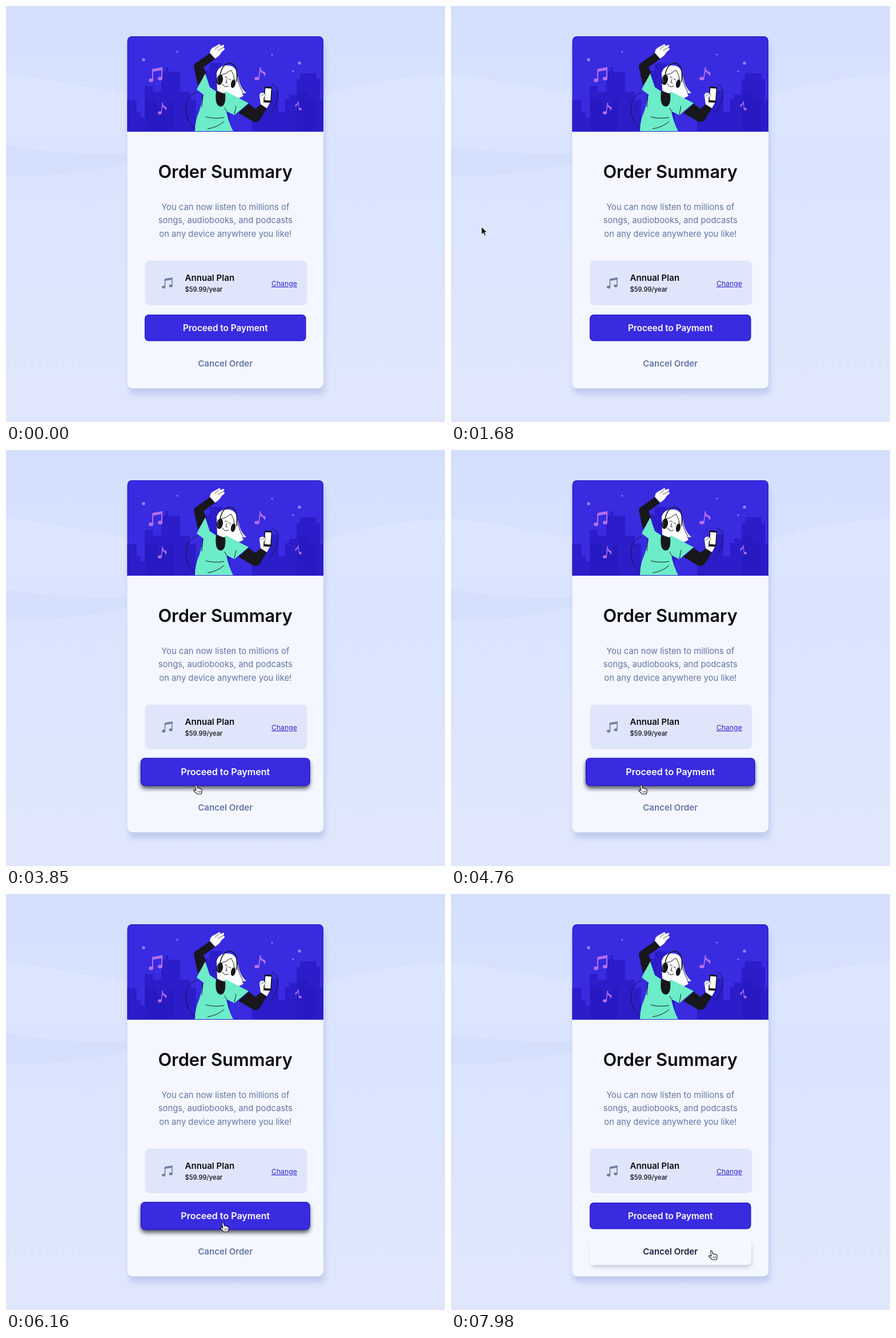
Write an HTML page that moves like this. It is 769 px wide and 728 px high and loops after 8000 ms.

```html
<!DOCTYPE html>
<html lang="en">
<head>
<meta charset="utf-8">
<title>Order Summary</title>
<style>
html, body { margin: 0; width: 100%; height: 100%; overflow: hidden; background: #dce5fd; }
svg { display: block; width: 100%; height: 100%; font-family: Inter, "Open Sans", sans-serif; }
.mid { text-anchor: middle; }
.semi { font-weight: 600; }
.ink { fill: #0b0b12; }
.muted { fill: #6474a6; }
.anim { animation: 8s linear infinite; }

#cursor { animation-name: travel; }
@keyframes travel {
  0%, 16.6% { transform: translate(-24px, 352px); animation-timing-function: ease-in; }
  21% { transform: translate(53px, 386px); }
  29% { transform: translate(200px, 474px); }
  36.75% { transform: translate(333px, 550px); animation-timing-function: ease-out; }
  41.5%, 67% { transform: translate(333px, 586px); animation-timing-function: ease-in-out; }
  75%, 92.2% { transform: translate(380px, 575px); animation-timing-function: ease-in-out; }
  98.6%, 100% { transform: translate(456px, 624px); }
}
#arrow { animation-name: arrow; animation-timing-function: step-end; }
@keyframes arrow { 0% { opacity: 1; } 37.6%, 100% { opacity: 0; } }
#hand { animation-name: hand; animation-timing-function: step-end; }
@keyframes hand { 0% { opacity: 0; } 37.6%, 100% { opacity: 1; } }

#pay { transform-origin: 384.2px 563px; animation-name: grow; }
@keyframes grow {
  0%, 37.6% { transform: scale(1); animation-timing-function: ease; }
  41.4%, 87.2% { transform: scale(1.05); animation-timing-function: ease-out; }
  89.3%, 100% { transform: scale(1); }
}
#lift { animation-name: lift; }
@keyframes lift {
  0%, 37.6% { opacity: 0; }
  41.4%, 87.2% { opacity: 1; }
  89.6% { opacity: .2; }
  92%, 100% { opacity: 0; }
}
#dent { animation-name: dent; }
@keyframes dent {
  0%, 87.2% { opacity: 0; }
  89%, 91% { opacity: 1; }
  94.5%, 100% { opacity: 0; }
}
#ripple { transform-origin: 380px 575px; animation-name: ripple; }
@keyframes ripple {
  0%, 87.2% { transform: scale(.1); opacity: 0; }
  87.4% { transform: scale(.2); opacity: 1; }
  90.1% { transform: scale(1); opacity: .9; }
  92.4%, 100% { transform: scale(1.25); opacity: 0; }
}
#cancelLift { animation-name: cancelLift; }
@keyframes cancelLift { 0%, 95.8% { opacity: 0; } 98.6%, 100% { opacity: 1; } }
#cancel { animation-name: cancel; }
@keyframes cancel { 0%, 95.8% { fill: #6474a6; } 98.6%, 100% { fill: #1b1f3d; } }
</style>
</head>
<body>
<svg viewBox="0 0 769 728" preserveAspectRatio="none">
  <defs>
    <linearGradient id="sky" x2="0" y2="1">
      <stop stop-color="#d3dffd"/><stop offset=".45" stop-color="#dae4fd"/><stop offset="1" stop-color="#e0e7fc"/>
    </linearGradient>
    <linearGradient id="haze" x2="0" y2="1">
      <stop stop-color="#e0e8ff" stop-opacity=".7"/><stop offset="1" stop-color="#e0e8ff" stop-opacity="0"/>
    </linearGradient>
    <radialGradient id="inset" r=".75"><stop offset=".4" stop-color="#1b0fa8" stop-opacity=".08"/><stop offset="1" stop-color="#1b0fa8" stop-opacity=".65"/></radialGradient>
    <filter id="soft" x="-20%" y="-50%" width="140%" height="200%"><feGaussianBlur stdDeviation="5"/></filter>
    <filter id="tight" x="-20%" y="-50%" width="140%" height="200%"><feGaussianBlur stdDeviation="3.5"/></filter>
    <clipPath id="header"><path d="M212.5 220V62q0-9 9-9H547q9 0 9 9V220Z"/></clipPath>
    <g id="pair">
      <path d="M7 3 24 0V5L7 8Z"/>
      <path d="M7 4V22M23 2V19" fill="none" stroke="currentColor" stroke-width="2"/>
      <ellipse cx="4" cy="23" rx="4" ry="3.3"/><ellipse cx="20" cy="20" rx="4" ry="3.3"/>
    </g>
    <g id="single">
      <path d="M10 0Q12 7 19 9Q21 13 17 16Q18 11 11 9Z"/>
      <path d="M10.5 0 8 19" fill="none" stroke="currentColor" stroke-width="1.8"/>
      <ellipse cx="4.5" cy="20" rx="4.5" ry="3"/>
    </g>
  </defs>

  <rect width="769" height="728" fill="url(#sky)"/>
  <path d="M0 119Q110 133 212 155V278Q100 303 0 299Z" fill="url(#haze)"/>
  <path d="M0 244Q110 262 212 258V275Q110 300 0 297Z" fill="#cfdcfa" opacity=".5"/>
  <path d="M556 158Q650 126 769 120V300H556Z" fill="url(#haze)"/>

  <rect x="215" y="64" width="344" height="616" rx="9" fill="#8ea4d8" opacity=".38" filter="url(#soft)"/>
  <rect x="212.5" y="53" width="343.5" height="616" rx="9" fill="#f4f7ff"/>

  <g clip-path="url(#header)">
    <rect x="212" y="53" width="345" height="168" fill="#382be0"/>
    <path d="M212 220V165H229V186H236V195H243V140H257V150H272V115H279V107H284V115H305V150H322V164H333V220ZM345 220V113H357V100H379V113H392V220ZM431 220V190H447V160H456V148H477V186H489V163H496V155H509V128H515V118H544V128H550V165H557V220Z" fill="#2b1dc9"/>
    <path d="M244 220V163H265V178H284V164H294V220M510 220V151H528V162H544V220" fill="#2618bd" opacity=".55"/>
    <g fill="#7590fa">
      <circle cx="241" cy="94" r="2.8"/><circle cx="514" cy="100" r="2.8"/>
      <circle cx="300" cy="80" r="1.5"/><circle cx="466" cy="85" r="1.5"/><circle cx="503" cy="114" r="1.6"/>
    </g>
    <g fill="#b66eeb" color="#b66eeb">
      <use href="#pair" x="250" y="107"/>
      <use href="#single" x="435" y="107"/>
      <use href="#single" transform="translate(266 169) scale(.78 .9)"/>
      <use href="#single" transform="translate(518 166) scale(-.58 .72)"/>
    </g>

    <g fill="none" stroke="#17133f" stroke-width="1">
      <path d="M334 151Q315 158 315 179T331 216M466 137Q479 142 476 159T462 188"/>
    </g>
    <path d="M358 82 331 101Q328 104 330 110L336 139 351 119 346 107 367 92Z" fill="#17171c"/>
    <path d="M357 82Q358 74 364 72L373 67Q377 66 374 70L381 68Q384 69 380 73L383 74Q384 76 378 80Q374 88 366 92Z" fill="#fff"/>
    <path d="M366 76 373 70M371 78 380 73" stroke="#23212c" stroke-width=".8"/>

    <path d="M369 117Q373 104 387 104Q401 104 405 117L409 134Q413 146 421 152Q416 154 413 151L416 157Q404 166 389 157L370 148Z" fill="#fff"/>
    <path d="M349 118 334 146 346 155Q342 177 335 193Q331 205 331 221H399Q390 205 386 184L400 191 425 170 386 150 369 150 357 142Z" fill="#6cecc8"/>
    <path d="M368 149Q365 175 376 176Q386 175 384 153Z" fill="#17171c"/>
    <path d="M370 123Q372 148 382 150Q394 149 397 137L394 114Q380 113 370 123Z" fill="#fff"/>
    <path d="M377 142 385 149 382 153 376 151Z" fill="#fff"/>
    <g fill="none" stroke="#1b1820" stroke-width="1">
      <path d="M376 121Q386 119 394 112Q400 120 400 129M383 125Q386 123 388 126M390 127 394 130M387 128 385 134 388 135M379 136Q383 144 390 140M405 118Q406 137 415 151"/>
      <path d="M345 156 343 177M350 194Q366 198 382 195M386 184 383 178M353 215Q371 212 382 202M400 190 403 175"/>
      <path d="M375 121Q379 100 393 100Q407 102 404 133" stroke-width="1.6"/>
    </g>
    <ellipse cx="374.5" cy="129" rx="5.5" ry="9" transform="rotate(12 374 129)" fill="#17171c"/>
    <ellipse cx="398" cy="136" rx="4" ry="7.5" transform="rotate(12 398 136)" fill="#17171c"/>
    <path d="M372 124Q369 129 372 134" fill="none" stroke="#777" stroke-width="1"/>

    <path d="M425 171 437 180 446 172 457 179 444 200Q438 206 431 201L407 187Z" fill="#17171c"/>
    <path d="M446 172 444 156Q445 151 451 152L463 157Q466 161 463 168L457 179Z" fill="#fff"/>
    <g transform="rotate(4 458 155)">
      <rect x="452" y="141" width="13.5" height="28" rx="2" fill="#17171c"/>
      <rect x="453.6" y="144" width="10.3" height="21" fill="#fff"/>
    </g>
    <path d="M446 158 453 153Q456 156 452 160L451 170" fill="#fff" stroke="#23212c" stroke-width=".7"/>
    <path d="M213 220V62q0-8.5 8.5-8.5H547q8.5 0 8.5 8.5V220" fill="none" stroke="#2518c6" stroke-width="1.2"/>
    <path d="M212 219.5H556" stroke="#3020cf"/>
  </g>

  <text class="mid ink semi" x="384.2" y="300.5" font-size="30.8">Order Summary</text>
  <g class="mid muted" font-size="14.8">
    <text x="384.3" y="356.5">You can now listen to millions of</text>
    <text x="384.3" y="380">songs, audiobooks, and podcasts</text>
    <text x="384.3" y="403.5">on any device anywhere you like!</text>
  </g>

  <rect x="243.5" y="445.5" width="284" height="78" rx="8" fill="#dfe6fc"/>
  <g fill="#717ca6" color="#717ca6"><use href="#pair" transform="translate(273 475) scale(.78 .74)"/></g>
  <text class="ink semi" x="313.5" y="481" font-size="15.1">Annual Plan</text>
  <text class="ink" x="313.5" y="500" font-size="11.2" font-weight="500">$59.99/year</text>
  <text x="465" y="490" font-size="12.2" fill="#3224cf" text-decoration="underline">Change</text>

  <g id="pay" class="anim">
    <rect id="lift" class="anim" x="243" y="544" width="282" height="47" rx="8" fill="#111320" fill-opacity=".72" filter="url(#tight)"/>
    <rect x="243.5" y="540.5" width="281.5" height="45.5" rx="6.5" fill="#382be0" stroke="#2418bf" stroke-width="1.2"/>
    <rect id="dent" class="anim" x="243.5" y="540.5" width="281.5" height="45.5" rx="6.5" fill="url(#inset)"/>
    <text class="mid semi" x="384.3" y="568.5" font-size="15.3" fill="#fff">Proceed to Payment</text>
  </g>

  <g id="cancelLift" class="anim">
    <rect x="246" y="609" width="280" height="44" rx="7" fill="#808aa8" opacity=".4" filter="url(#tight)"/>
    <rect x="243" y="602" width="283" height="47" rx="7" fill="#f5f8ff"/>
  </g>
  <text id="cancel" class="anim mid semi" x="384.2" y="631" font-size="15.1" fill="#6474a6">Cancel Order</text>

  <circle id="ripple" class="anim" cx="380" cy="575" r="22" fill="#6f9bf5" fill-opacity=".12" stroke="#668fec" stroke-width="3"/>

  <g id="cursor" class="anim">
    <path id="arrow" class="anim" d="M0 0V14L3.2 11 5.5 16 8 15 5.8 10H10Z" fill="#0c0c10" stroke="#fff" stroke-width="1"/>
    <g id="hand" class="anim">
      <path d="M-1.5 1.2Q0-.8 1.3 1.2L2.5 6Q4.4 4.8 5.2 6.4Q7 5.6 7.7 7.2Q10 6.7 10.2 9.2Q10.6 13 8.7 16H1.5Q-1 13-4 10.5Q-4.8 8.4-2.6 8.5L0 10Z" fill="#fff" stroke="#14141c" stroke-width="1.1" stroke-linejoin="round"/>
      <path d="M3 10.5 3.6 13.8M5.3 10.2 5.8 13.6M7.6 10 7.7 13.3" fill="none" stroke="#14141c" stroke-width=".8"/>
    </g>
  </g>
</svg>
</body>
</html>
```
